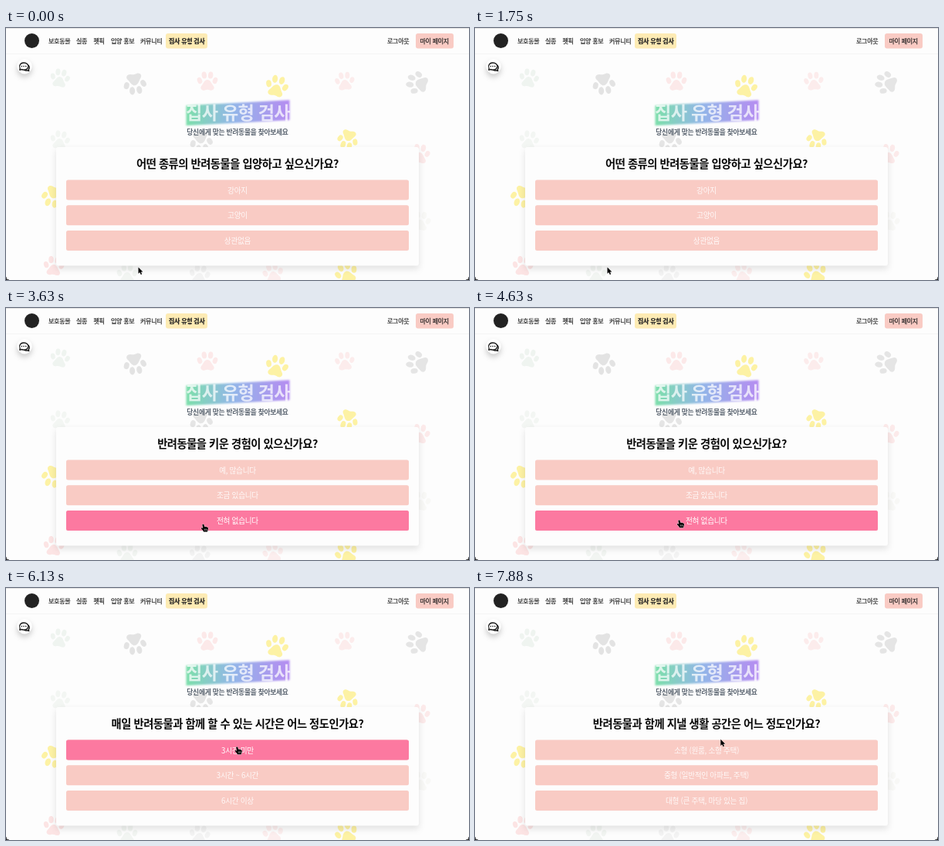
Recreate the animation shown at these times as an HTML page. Size 600 px wide and 326 px high, loop 8 s.

```html
<!DOCTYPE html>
<html lang="ko">
<head>
<meta charset="utf-8">
<style>
  html, body { margin: 0; height: 100%; overflow: hidden; background: #fdfdfd; }
  svg { display: block; width: 100vw; height: 100vh; }
  text { font-family: "Noto Sans CJK KR", "Noto Sans KR", sans-serif; letter-spacing: -.033em; }
  .nav { font-size: 8px; font-weight: 500; fill: #222; stroke: #222; stroke-width: .2px; }
  .mid { text-anchor: middle; }
  .opt { font-size: 9.7px; fill: #fff; }
  .card { filter: drop-shadow(0 4px 4px rgba(0,0,0,.11)); }
  .chat { filter: drop-shadow(0 4px 3.5px rgba(0,0,0,.2)); }
</style>
</head>
<body>
<svg viewBox="0 0 600 326">
  <defs>
    <linearGradient id="glow">
      <stop offset="0" stop-color="#7ddfab"/>
      <stop offset=".45" stop-color="#92b6e8"/>
      <stop offset="1" stop-color="#b58cf1"/>
    </linearGradient>
    <filter id="soft"><feGaussianBlur stdDeviation="1.2"/></filter>
    <g id="paw">
      <path d="M0-2C4-2 5 2.5 7.5 5.5C10.5 9 7.5 12.5 3.5 11.5C1 10.6-1 10.6-3.5 11.5C-7.5 12.5-10.5 9-7.5 5.5C-5 2.5-4-2 0-2Z"/>
      <ellipse cx="-10" cy="-1" rx="3.1" ry="4.2" transform="rotate(-22 -10 -1)"/>
      <ellipse cx="-4.2" cy="-8" rx="3.2" ry="4.6" transform="rotate(-6 -4.2 -8)"/>
      <ellipse cx="4.2" cy="-8" rx="3.2" ry="4.6" transform="rotate(6 4.2 -8)"/>
      <ellipse cx="10" cy="-1" rx="3.1" ry="4.2" transform="rotate(22 10 -1)"/>
    </g>
  </defs>

  <rect width="600" height="326" fill="#fdfdfd"/>
  <g id="paws"></g>

  <path d="M0 .5H600" stroke="#e2e2e2"/>
  <path d="M0 33.5H600" stroke="#f5f5f5"/>
  <circle cx="33.5" cy="16.5" r="9.5" fill="#222"/>
  <rect x="207" y="7" width="54" height="19.5" rx="3" fill="#fdebb4"/>
  <rect x="531" y="7" width="49" height="19.5" rx="3" fill="#f9cbc4"/>
  <g id="nav"></g>

  <g class="chat"><circle cx="24" cy="49.7" r="9.7" fill="#fff"/></g>
  <g fill="#fff" stroke="#111" stroke-width="1.3" stroke-linejoin="round">
    <path d="M26 47.5c3 0 4.5 1.8 4.3 3.9c-.1 1-.6 1.8-1.1 2.3l.6 2l-2.3-.9c-2.4.5-4.6-.2-5.3-2Z"/>
    <path d="M18.2 52.2C16.3 48.5 19 45 23 45s6 2.5 6 4.6s-2 4.5-6 4.5c-1 0-1.8-.1-2.6-.5l-2.6.8Z"/>
  </g>
  <path d="M20.3 49.6h.1M23 49.6h.1M25.7 49.6h.1" stroke="#111" stroke-width="1.5" stroke-linecap="round"/>

  <rect x="-67" y="-13" width="134" height="26" fill="url(#glow)" filter="url(#soft)" transform="translate(300.5 109.7) skewY(-3)"/>
  <text class="mid" x="300.5" y="118.2" font-size="23.2" font-weight="700" fill="#fff" fill-opacity=".72">집사 유형 검사</text>
  <text class="mid" x="300" y="138.2" font-size="8.8" font-weight="700" fill="#59636f">당신에게 맞는 반려동물을 찾아보세요</text>

  <rect class="card" x="65" y="154" width="470" height="153.5" rx="3" fill="#fdfdfd"/>
  <text id="question" class="mid" x="300" y="181.2" font-size="14.3" font-weight="700" fill="#080808"></text>
  <g id="rows"></g>

  <path d="M0 322V326H4Q0 326 0 322ZM600 322V326H596Q600 326 600 322Z" fill="#222" stroke="#222" stroke-width=".6"/>

  <g id="cursor">
    <path id="arrow" d="M0 0V9.2L2.1 7.3L3.6 10.6L5.2 9.9L3.8 6.7H6.6Z" transform="translate(0 -.5) scale(.9)" fill="#000" stroke="#fff" stroke-width=".6" paint-order="stroke"/>
    <g id="hand" transform="translate(-.5 0) scale(.9)">
      <path d="M0 0C1 0 1.3.7 1.4 1.4L1.8 3.6C2.5 3 3.3 3.2 3.7 3.8C4.4 3.4 5.2 3.7 5.5 4.4C6.6 4.1 7.3 4.9 7.2 6C7.1 8 6.5 9 6 10.8H.7C.2 9.3-1.2 8-2.6 6.4C-3.3 5.5-2.2 4.6-1.2 5.2L-.2 6L-1.1 1.4C-1.3.7-.8 0 0 0Z" fill="#000" stroke="#fff" stroke-width=".8" paint-order="stroke"/>
      <path d="M2.2 6.5V9M3.8 6.5V9M5.3 6.5V9" stroke="#fff" stroke-width=".55"/>
    </g>
  </g>
</svg>
<script>
const $ = id => document.getElementById(id);
const LOOP = 8000, ROW_Y = [196.5, 229.2, 262], ROW_H = 26;

// x, y, turn, scale, colour
const paws = [
  [70, 65, 10, .95, '#eff4f0'], [167, 72, 172, 1.1, '#e3e3e3'], [261, 69, 0, 1, '#fce9e9'],
  [351, 75.5, 14, 1.1, '#fdf2a4'], [439, 69, -5, .95, '#fcecec'], [533, 71, -75, 1.1, '#e5e5e5'],
  [70, 145, 10, .95, '#f3f6f3'], [253, 147, 172, 1.1, '#e5e5e5'], [443, 144, 195, 1, '#fdf2a4'],
  [536, 163, 5, 1, '#fceaea'], [61, 218, 195, 1.1, '#fdf2a4'], [537, 250, 5, 1, '#f8f8f6'],
  [62, 308, 5, 1, '#fce4e4'], [157, 318, 0, 1, '#f2f5f2'], [251, 319, 8, 1, '#f3f3f3'],
  [346, 317, -10, 1, '#fceeee'], [441, 317, -20, 1.1, '#fdf2a4']
];
$('paws').innerHTML = paws.map(([x, y, turn, size, fill]) =>
  `<use href="#paw" fill="${fill}" transform="translate(${x} ${y}) rotate(${turn}) scale(${size})"/>`).join('');

const nav = [[55, '보호동물'], [91, '실종'], [113.5, '펫픽'], [136, '입양 홍보'], [174, '커뮤니티'],
  [211, '집사 유형 검사', 700], [494, '로그아웃'], [536.5, '마이 페이지']];
$('nav').innerHTML = nav.map(([x, label, weight = 500]) =>
  `<text class="nav" x="${x}" y="20" style="font-weight:${weight}">${label}</text>`).join('');

$('rows').innerHTML = ROW_Y.map(y => `
  <rect x="78" y="${y}" width="444" height="${ROW_H}" rx="2.5" fill="#f9cbc4"/>
  <rect class="hot" x="78" y="${y}" width="444" height="${ROW_H}" rx="2.5" fill="#fc79a0"/>
  <text class="opt mid" x="300" y="${y + 17}"></text>`).join('');
const hot = document.querySelectorAll('.hot'), options = document.querySelectorAll('.opt');

// start time, question, answers
const pages = [
  [0, '어떤 종류의 반려동물을 입양하고 싶으신가요?', '강아지', '고양이', '상관없음'],
  [3120, '반려동물을 키운 경험이 있으신가요?', '예, 많습니다', '조금 있습니다', '전혀 없습니다'],
  [4870, '매일 반려동물과 함께 할 수 있는 시간은 어느 정도인가요?', '3시간 미만', '3시간 ~ 6시간', '6시간 이상'],
  [6500, '반려동물과 함께 지낼 생활 공간은 어느 정도인가요?', '소형 (원룸, 소형 주택)', '중형 (일반적인 아파트, 주택)', '대형 (큰 주택, 마당 있는 집)']
];

// pointer moves: start, end, x, y
const moves = [[0, 1, 171.5, 310], [1900, 2450, 256, 279.8], [3800, 4300, 265, 274.5],
  [5700, 6120, 299.8, 205.5], [7250, 7700, 318.3, 196.2]];

function pointer(t) {
  let x = 171.5, y = 310;
  for (const [start, end, toX, toY] of moves) {
    const p = Math.min(1, Math.max(0, (t - start) / (end - start)));
    const ease = p * p * (3 - 2 * p);
    x += (toX - x) * ease;
    y += (toY - y) * ease;
  }
  return [x, y];
}

const rowAt = t => {
  const y = pointer(t)[1];
  return ROW_Y.findIndex(top => y >= top && y <= top + ROW_H);
};

// Hover colour fades over about 150 ms
const heat = (t, row) => {
  let sum = 0;
  for (let i = 0; i < 6; i++) sum += rowAt(t - i * 25) === row;
  return sum / 6;
};

let shown;
function draw(now) {
  const t = now % LOOP;
  const page = pages.filter(p => p[0] <= t).pop();
  if (page !== shown) {
    shown = page;
    $('question').textContent = page[1];
    options.forEach((el, i) => el.textContent = page[i + 2]);
  }
  options.forEach((el, i) => {
    const h = heat(t, i);
    hot[i].setAttribute('opacity', h);
    el.setAttribute('fill-opacity', .88 + .12 * h);
  });
  const over = rowAt(t) >= 0;
  $('cursor').setAttribute('transform', `translate(${pointer(t)})`);
  $('hand').style.display = over ? '' : 'none';
  $('arrow').style.display = over ? 'none' : '';
}

const begin = performance.now();
function tick() {
  draw(Math.max(0, performance.now() - begin));
  requestAnimationFrame(tick);
}
tick();
</script>
</body>
</html>
```
